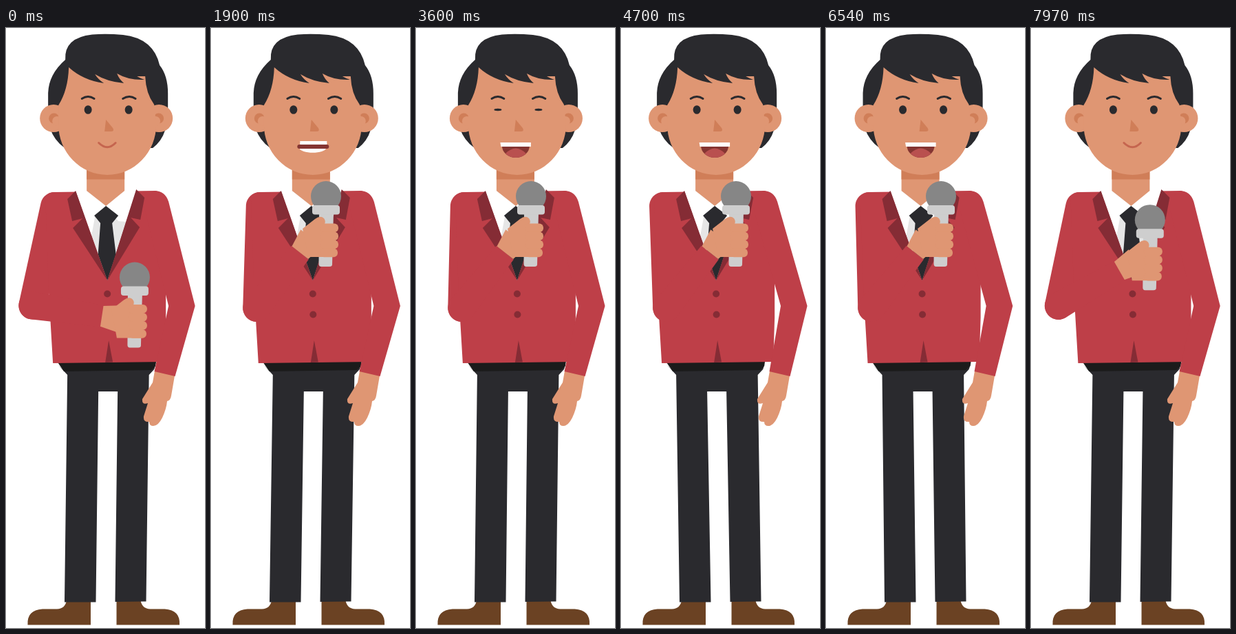
These frames come from a looping animation (289 px wide and 870 px high, 8 s). An HTML page:

```html
<!DOCTYPE html>
<html lang="en">
<head>
<meta charset="utf-8">
<title>Presenter</title>
<style>
  html, body { margin: 0; width: 100%; height: 100%; overflow: hidden; background: #fff; }
  svg { display: block; width: 100%; height: 100%; }
  .dark { fill: #2a2a2e; }
  .skin { fill: #df9673; }
  .shade { fill: #d07e58; }
  .coat { fill: #be3f48; }
  .lapel { fill: #852c35; }
  .white { fill: #fff; }
  .mouth { fill: #843532; }
  .metal { fill: #cecece; }
  .brow { fill: none; stroke: #2a2a2e; stroke-width: 2.8; stroke-linecap: round; }
</style>
</head>
<body>
<svg viewBox="0 0 289 870">
  <defs>
    <path id="shoe" d="M31.500 865.500Q30 844 53 842.500H74Q86 842 88 830H123V865.500Z" fill="#6b4223"/>
  </defs>

  <use href="#shoe"/>
  <use href="#shoe" transform="matrix(-1 0 0 1 283.500 0)"/>
  <path id="legs" class="dark"/>

  <g class="sway">
    <path d="M75 485L218 483L217 490L211 496L84 498Z" fill="#1b1b1b"/>
  </g>
  <path id="upperArm" fill="none" stroke="#be3f48" stroke-width="40" stroke-linecap="round"/>
  <g class="sway">
    <path class="coat" d="M57 245Q62 238 70 238L217 236Q230 240 232 260V420L230 484L68 486L62 385Z"/>
  </g>

  <path class="skin" d="M216 497L245 504L240 533Q239 540 234 541Q233 552 227 565Q221 577 214 577Q208 577 208 571Q199 572 200 563L206 544Q197 547 198 538Q208 522 213 514Z"/>
  <path id="rightArm" class="coat"/>

  <g class="sway">
    <path d="M101 236H189L147 366Z" fill="#e6e6e6"/>
    <path class="white" d="M101 236H117L145 258L129 274L124 301Z"/>
    <path class="white" d="M189 235H172L145 258L163 280L174 281Z"/>
    <path class="skin" d="M117 200H172V236L145 258L117 236Z"/>
    <path class="shade" d="M117 200H172V219.500H117Z"/>
    <path class="dark" d="M145 258L163 272L154 283L159.500 328L147 366L133.500 328L137 283L128 272Z"/>
    <path class="lapel" d="M101 236L89 248L96 280L111 276L97 290L147 366ZM189 234L201 246L195 278L181 275L194 289L147 366Z"/>
    <path class="lapel" d="M149 453L144 485L155 484.500Z"/>
    <circle class="lapel" cx="147" cy="385.500" r="5"/>
    <circle class="lapel" cx="147.500" cy="415.500" r="5"/>

    <path class="dark" d="M61 115V94Q62 67 86 46Q84 14 125 9.500Q146 8 170 10Q214 15 223 54Q235 69 235 95V115L231 148Q226 164 213 174L84 173Q70 163 64 146Z"/>
    <circle class="skin" cx="69" cy="131" r="20"/>
    <circle class="skin" cx="222" cy="131" r="20"/>
    <circle class="shade" cx="69.500" cy="131" r="7.500"/>
    <circle class="shade" cx="221.500" cy="131" r="7.500"/>
    <circle class="skin" cx="74" cy="135" r="7"/>
    <circle class="skin" cx="217" cy="135" r="7"/>
    <path class="skin" d="M76 112Q90 90 91 57Q112 76 142 80Q134 75 129 67Q147 78 171 80Q164 74 161 66Q178 76 201 75Q195 73 190 70H202Q203 95 215 111L218 140A71 73 0 0 1 76 140Z"/>
    <path class="brow" d="M110 102.500Q119 96.500 128 102.500M169.500 102.500Q179 96.500 188 102.500"/>
    <ellipse class="eye dark" cx="119" cy="118.500" rx="5.500"/>
    <ellipse class="eye dark" cx="178" cy="118.500" rx="5.500"/>
    <path class="shade" d="M145 133L155 145Q158 150 152 150H143Z"/>

    <path id="smile" d="M134.500 166.500Q147 179 159 166.500" fill="none" stroke="#c5654f" stroke-width="3" stroke-linecap="round"/>
    <g id="open">
      <path class="mouth" d="M125 171H165A20 17 0 0 1 125 171Z"/>
      <path d="M130 182Q145 167 160 182Q154 188 145 188Q136 188 130 182Z" fill="#b9504f"/>
      <path class="white" d="M122.500 166H167V172H123.500Z"/>
    </g>
    <g id="teeth">
      <path class="white" d="M128.500 164H167.500V171H128.500ZM127.500 174H166.500C165 183 129 183 127.500 174Z"/>
      <rect class="mouth" x="124.500" y="169" width="46" height="6" rx="3"/>
    </g>
    <g id="round">
      <rect class="mouth" x="123" y="170" width="47" height="12" rx="4"/>
      <path class="white" d="M126 171Q129 165 138 165.500Q147 164 156 165.500Q164 165 167 171Z"/>
    </g>
  </g>

  <path id="forearm" class="coat"/>
  <g id="micHand">
    <circle cx="167" cy="244" r="22" fill="#868686"/>
    <path class="metal" d="M157 266H178L176 343Q176 346 172 346H160Q156.500 346 156.500 342Z"/>
    <rect class="metal" x="147" y="257" width="40" height="13.500" rx="4"/>
    <path id="wrist" class="skin" d="M-27 -15L0 -20V20L-27 15Z"/>
    <path class="skin" d="M133 291L151 277Q159 271 164 276Q167 280 165 284H176V332H141L137 310Z"/>
    <g id="fingers" class="skin"></g>
  </g>
</svg>
<script>
  const LOOP = 8000;
  const UPPER = 148, LOWER = 129, WRIST = 27;
  const $ = id => document.getElementById(id);
  const clamp = (v, lo, hi) => Math.min(hi, Math.max(lo, v));
  const ease = x => { x = clamp(x, 0, 1); return x * x * (3 - 2 * x); };
  const swayParts = document.querySelectorAll('.sway');
  const eyes = document.querySelectorAll('.eye');
  const mouths = ['smile', 'open', 'teeth', 'round'];

  $('fingers').innerHTML = [0, 1, 2, 3].map(i =>
    `<rect x="158" y="${283.5 + i * 12}" width="${i === 3 ? 26 : 27}" height="12.8" rx="6"/>`).join('');

  function mouthAt(t) {
    if (t < 825 || t > 7632) return 'smile';
    const beat = (t + 195) % 600;
    return beat < 200 ? 'open' : beat < 390 ? 'teeth' : 'round';
  }

  function drawBody(d) {
    for (const part of swayParts) part.setAttribute('transform', `translate(${d} 0)`);
    const x = v => v + d;
    $('legs').setAttribute('d',
      `M${x(75)} 488L${x(84)} 497L${x(211)} 495L${x(217)} 489L${x(215)} 495L${x(207.5)} 503` +
      `L203.500 831.500L158.500 832L${x(162)} 527H${x(134)}L130.500 832.500H85L${x(89)} 503Z`);
    const bend = d * .45;
    $('rightArm').setAttribute('d',
      `M${x(198)} 250L${x(215)} 236Q${x(231)} 236 ${x(236)} 252L${274.5 + bend} 403` +
      `L245.500 505L215.500 498L${236 + bend} 403Z`);
  }

  // Two-bone arm: the shoulder sways, the hand follows a straight line.
  function drawMicArm(d, lowered) {
    const dx = 21.7 * lowered, dy = 128 * lowered;
    const sx = 70 + d, sy = 258, hx = 146 + dx, hy = 304.5 + dy;
    const dist = Math.hypot(hx - sx, hy - sy);
    const angle = Math.atan2(hy - sy, hx - sx) +
      Math.acos((dist * dist + UPPER * UPPER - LOWER * LOWER) / (2 * dist * UPPER));
    const ex = sx + UPPER * Math.cos(angle), ey = sy + UPPER * Math.sin(angle);
    const turn = Math.atan2(hy - ey, hx - ex), c = Math.cos(turn), s = Math.sin(turn);
    const wx = hx - WRIST * c, wy = hy - WRIST * s;
    const side = (px, py, w) => `${px - s * w} ${py + c * w}`;

    $('upperArm').setAttribute('d', `M${sx} ${sy}L${ex} ${ey}`);
    $('forearm').setAttribute('d',
      `M${side(ex, ey, -20)}L${side(wx, wy, -16)}L${side(wx, wy, 16)}L${side(ex, ey, 20)}` +
      `A20 20 0 0 1 ${side(ex, ey, -20)}Z`);
    $('micHand').setAttribute('transform', `translate(${dx} ${dy})`);
    $('wrist').setAttribute('transform', `translate(146 304.5) rotate(${turn * 180 / Math.PI})`);
  }

  function draw(t) {
    const d = -4.1 + 5.1 * Math.cos((t - 1815) * Math.PI / 1000);
    const lowered = t < 825 ? 1 - ease((t + 175) / 1000) : ease((t - 7632) / 1000);
    drawBody(d);
    drawMicArm(d, lowered);

    const blink = clamp(Math.abs((t + 1180) % 2400 - 2400 * .5 + 1200 - 2400 * .5 + 0) / 70, .12, 1);
    for (const eye of eyes) eye.setAttribute('ry', 6.3 * eyeOpen(t));
    const current = mouthAt(t);
    for (const m of mouths) $(m).style.display = m === current ? '' : 'none';
  }

  // Blinks every 2.4 s, first at 1.22 s.
  function eyeOpen(t) {
    return clamp(Math.abs((t + 2380) % 2400 - 1200) / 70, .12, 1);
  }

  const start = performance.now();
  function tick() {
    draw((performance.now() - start) % LOOP);
    requestAnimationFrame(tick);
  }
  tick();
</script>
</body>
</html>
```
